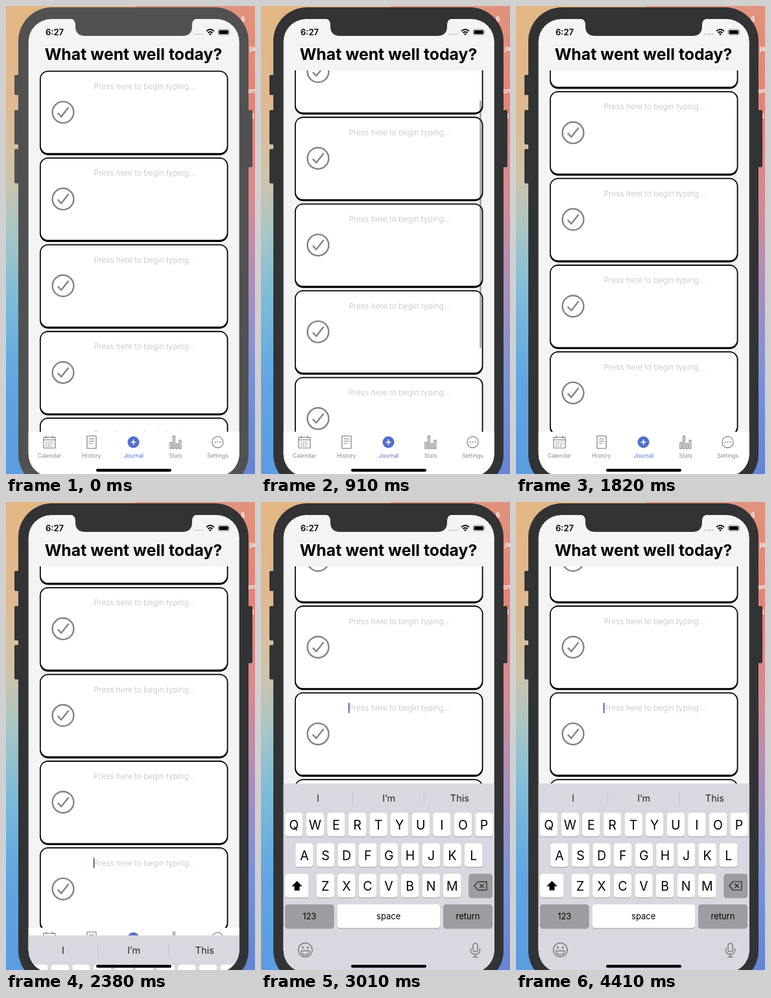
These frames come from a looping animation (384 px wide and 720 px high, 4.48 s). An HTML page:

```html
<!DOCTYPE html>
<html lang="en">
<head>
<meta charset="utf-8">
<title>Journal</title>
<style>
html, body { margin: 0; width: 100%; height: 100%; overflow: hidden; background: #333; }
svg { display: block; width: 384px; height: 720px; font-family: Inter, "Liberation Sans", sans-serif; }
.hint { font-size: 12px; font-weight: 300; fill: #bebec2; }
.tab { font-size: 8.6px; fill: #8b8b8f; text-anchor: middle; }
.key { font-size: 19.5px; text-anchor: middle; }
.word { font-size: 13px; text-anchor: middle; }
.guess { font-size: 14.5px; text-anchor: middle; fill: #222; }
.line { fill: none; stroke: #7b7b7f; stroke-width: 1.2; stroke-linecap: round; stroke-linejoin: round; }
</style>
</head>
<body>
<svg viewBox="0 0 384 720">
  <defs>
    <linearGradient id="warm" x2="0" y2="1">
      <stop offset="0" stop-color="#e3b683"/>
      <stop offset=".2" stop-color="#e0b992"/>
      <stop offset=".36" stop-color="#d0c3a8"/>
      <stop offset=".48" stop-color="#a8c6c4"/>
      <stop offset=".62" stop-color="#7dbcd8"/>
      <stop offset=".8" stop-color="#5fa6e2"/>
      <stop offset="1" stop-color="#5c9ce0"/>
    </linearGradient>
    <linearGradient id="cool" x2="0" y2="1">
      <stop offset="0" stop-color="#e0937c"/>
      <stop offset=".2" stop-color="#e68377"/>
      <stop offset=".4" stop-color="#d98a90"/>
      <stop offset=".6" stop-color="#a98fbc"/>
      <stop offset=".8" stop-color="#7a92d8"/>
      <stop offset="1" stop-color="#6484d6"/>
    </linearGradient>
    <clipPath id="screen"><rect x="34.7" y="20" width="325" height="704" rx="35"/></clipPath>
    <clipPath id="list"><rect x="34" y="99" width="326" height="556"/></clipPath>
  </defs>

  <rect width="200" height="720" fill="url(#warm)"/>
  <rect x="200" width="184" height="720" fill="url(#cool)"/>
  <g fill="#fff" font-size="10" font-weight="600">
    <text x="362" y="24">8</text><text x="376" y="69">ja</text>
    <text x="373" y="134">on</text><text x="380" y="173">i</text>
  </g>

  <g id="body">
    <path d="M20 106h-5q-2 0-2 2v27q0 2 2 2h5zM20 160h-5q-2 0-2 2v49q0 2 2 2h5zM20 220h-5q-2 0-2 2v49q0 2 2 2h5zM373 160h5q2 0 2 2v84q0 2-2 2h-5z"/>
    <rect x="19" y="2" width="355" height="740" rx="52"/>
  </g>

  <g clip-path="url(#screen)">
    <rect x="34" y="20" width="326" height="704" fill="#f4f4f4"/>
    <g clip-path="url(#list)">
      <g id="cards"></g>
      <rect id="thumb" x="337.2" width="2.6" height="381" rx="1.3"/>
    </g>
    <text x="196.5" y="83" font-size="24.8" font-weight="700" text-anchor="middle">What went well today?</text>
    <text x="61" y="45" font-size="13" font-weight="600">6:27</text>
    <g fill="#c9c9cb">
      <circle cx="291" cy="43.3" r="1.3"/><circle cx="295" cy="43.3" r="1.3"/>
      <circle cx="299" cy="43.3" r="1.3"/><circle cx="303" cy="43.3" r="1.3"/>
    </g>
    <path d="M309.3 38.8Q315 33.3 320.7 38.8M311.6 41.4Q315 38.2 318.4 41.4" fill="none" stroke="#000" stroke-width="2"/>
    <path d="M315 45.2l-2-2.2q2-1.6 4 0z"/>
    <rect x="327" y="35.8" width="17.4" height="8.8" rx="2.4" fill="none" stroke="#999" stroke-width=".9"/>
    <rect x="328.4" y="37.2" width="14.6" height="6" rx="1.3"/>
    <path d="M345.5 38.6q1.6 1.6 0 3.2z" fill="#999"/>

    <rect x="34" y="655" width="326" height="70" fill="#fff"/>
    <g class="line">
      <path d="M58 663.5h18v16.5h-18zM58 667.5h18M62 661.5v3M72 661.5v3"/>
      <path d="M62 671h11M61 674h12M61 677h9" stroke-dasharray="1.6 2" stroke-linecap="butt" stroke-width="1.7"/>
      <path d="M125 661.5h14v19h-14zM128.5 666h7M128.5 669.5h7M128.5 673h4"/>
      <path d="M253 671.5h2.6v9.5h-2.6zM257.7 661.5h2.6v19.5h-2.6zM262.5 673.5h2.6v7.5h-2.6zM267.2 668h2.6v13h-2.6z"/>
      <circle cx="326.5" cy="671" r="8.6"/>
    </g>
    <g fill="#7b7b7f"><circle cx="322.5" cy="671" r="1.1"/><circle cx="326.5" cy="671" r="1.1"/><circle cx="330.5" cy="671" r="1.1"/></g>
    <circle cx="196.5" cy="671" r="9" fill="#536dcb"/>
    <path d="M192.5 671h8M196.5 667v8" stroke="#fff" stroke-width="1.7"/>
    <g id="tabs"></g>

    <g id="keyboard">
      <rect x="34" width="326" height="320" fill="#d8d9e0"/>
      <path d="M141.5 13v20M251.5 13v20" stroke="#c3c5cc"/>
      <g id="keys"></g>
      <path d="M55.5 150l8.3 8.2h-4.3v6.4h-8v-6.4h-4.3z"/>
      <path class="line" style="stroke:#222" d="M329 157.5l5.5-6.5h13.5v13h-13.5zM337.5 154.5l6 6M343.5 154.5l-6 6"/>
      <g class="line" style="stroke:#77797f;stroke-width:1.5">
        <circle cx="68.3" cy="256" r="10.7"/>
        <path d="M61.8 257.5h13q-.5 6-6.500 6t-6.500-6z"/>
        <rect x="327" y="246" width="7" height="13" rx="3.5"/>
        <path d="M323.5 254v2q0 7 7 7t7-7v-2M330.5 263v4M327 267h7"/>
      </g>
      <g fill="#77797f"><ellipse cx="64.5" cy="252.5" rx="1.3" ry="1.9"/><ellipse cx="72" cy="252.5" rx="1.3" ry="1.9"/></g>
    </g>
    <rect x="139" y="712" width="116" height="4.4" rx="2.2"/>
  </g>
  <path id="notch" d="M96 19q11 0 11 10v2q0 15 15 15h150q15 0 15-15v-2q0-10 11-10z"/>
</svg>
<script>
const $ = id => document.getElementById(id);
const LOOP = 4480, STEP = 70, PITCH = 133.45;

const text = (cls, x, y, label) => `<text class="${cls}" x="${x}" y="${y}">${label}</text>`;

const card = i => `<g transform="translate(0 ${100 + i * PITCH})">
  <rect x="52" y="-.5" width="290.5" height="130" rx="13"/>
  <rect x="53.7" y="1.3" width="287" height="125" rx="11" fill="#fff"/>
  <g fill="none" stroke="#828284" stroke-width="2.4">
    <circle cx="88" cy="63.5" r="16.4"/><path d="M79.8 64.5l5.5 5.6 11.3-14.3"/>
  </g>
  ${text("hint", 135.5, 28, "Press here to begin typing...")}
  ${i === 4 ? '<rect id="caret" x="134.7" y="15.5" width="1.7" height="16" fill="#4a5585"/>' : ""}</g>`;

const key = (x, y, w, label = "", fill = "#fff", cls = "key", base = 25.5) =>
  `<rect x="${x}" y="${y + 1}" width="${w}" height="36.5" rx="4.5" fill="#97999f"/>
   <rect x="${x}" y="${y}" width="${w}" height="36.5" rx="4.5" fill="${fill}"/>` +
  text(cls, x + w / 2, y + base, label);

const row = (letters, x, y) => [...letters].map((c, i) => key(x + i * 32.6, y, 27.4, c)).join("");

$("cards").innerHTML = [0, 1, 2, 3, 4, 5].map(card).join("");
$("tabs").innerHTML = ["Calendar", "History", "Journal", "Stats", "Settings"]
  .map((name, i) => text("tab", 67 + i * 64.9, 695, name)).join("");
$("tabs").children[2].style.fill = "#536dcb";
$("keys").innerHTML =
  ["I", "I’m", "This"].map((w, i) => text("guess", 88 + i * 109.2, 28.3, w)).join("") +
  row("QWERTYUIOP", 37, 45) + row("ASDFGHJKL", 53.2, 92) + row("ZXCVBNM", 85.5, 139) +
  key(37, 139, 36.5) + key(320.5, 139, 36.5, "", "#9c9da0") +
  key(37, 186, 75.5, "123", "#9c9da0", "word", 22.5) +
  key(117.5, 186, 158.5, "space", "#fff", "word", 22.5) +
  key(281, 186, 76, "return", "#9c9da0", "word", 22.5);

const ramp = (t, a, b) => Math.min(1, Math.max(0, (t - a) / (b - a)));
const ease = u => u * u * (3 - 2 * u);

// Critically damped spring: fraction of the way still to go.
const spring = ms => { const x = Math.max(0, ms) * 0.0151; return (1 + x) * Math.exp(-x); };

function caretOpacity(t) {
  if (t < 2310) return 0;
  const p = (t - 2310) % 1000;
  return 1 - ramp(p, 700, 850) + ramp(p, 900, 1000);
}

function draw(t) {
  const offset = 102 * ease(ramp(t, 337, 1331)) + 238.5 * ease(ramp(t, 2680, 2980));
  const shade = t < 210 ? "#515151" : "#323334";
  $("body").setAttribute("fill", shade);
  $("notch").setAttribute("fill", shade);
  $("cards").setAttribute("transform", `translate(0 ${-offset})`);
  $("thumb").setAttribute("y", 103 + offset * 0.68);
  $("thumb").setAttribute("opacity", 0.35 * (ramp(t, 330, 430) - ramp(t, 1600, 1850)));
  $("caret").setAttribute("opacity", caretOpacity(t));
  $("keyboard").setAttribute("transform", `translate(0 ${433 + 295 * spring(t - 2324)})`);
}

const start = performance.now();
function tick() {
  const t = (performance.now() - start) % LOOP;
  draw(Math.floor(t / STEP) * STEP);
  requestAnimationFrame(tick);
}
tick();
</script>
</body>
</html>
```
